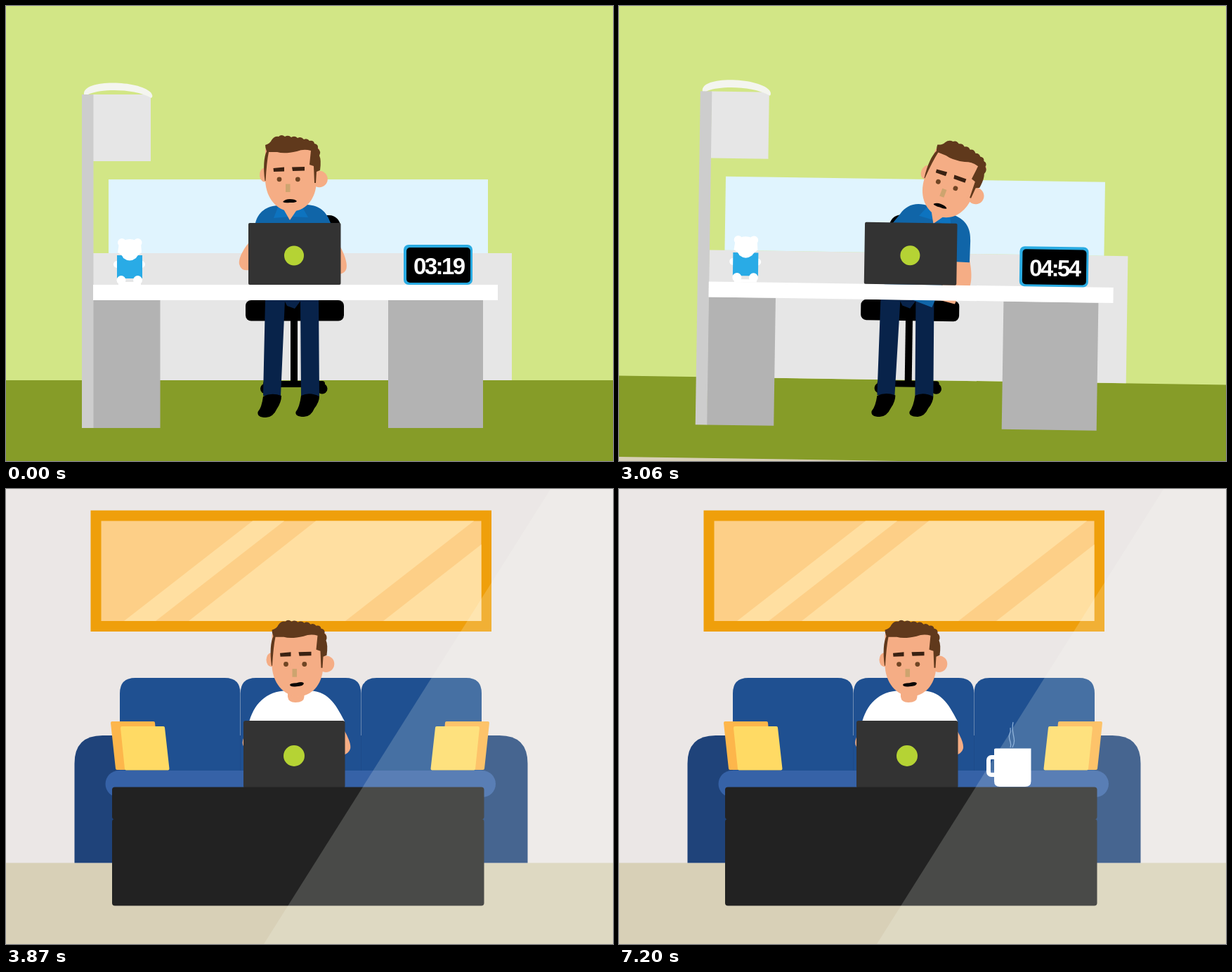
These frames come from a looping animation (864 by 648 pixels, 7230 ms). An HTML page:

```html
<!DOCTYPE html>
<html lang="en">
<head>
<meta charset="utf-8">
<title>Office to sofa</title>
<style>
  html, body { margin: 0; width: 100%; height: 100%; overflow: hidden; background: #d2e686; }
  svg { display: block; width: 100%; height: 100%; }
  text { font: bold 33px "Liberation Sans", Arial, sans-serif; letter-spacing: -2.6px; fill: #fff; }
</style>
</head>
<body>
<svg id="stage" viewBox="0 0 864 648"></svg>
<script>
const LOOP = 7230;
const SKIN = '#f5ad85', HAIR = '#60391c', SHIRT = '#1065a8', LIME = '#b5d334';
const stage = document.getElementById('stage');

const rect = (x, y, w, h, fill, rx = 0) =>
  `<rect x="${x}" y="${y}" width="${w}" height="${h}" rx="${rx}" fill="${fill}"/>`;
const dot = (x, y, r, fill) => `<circle cx="${x}" cy="${y}" r="${r}" fill="${fill}"/>`;
const path = (d, fill, extra = '') => `<path d="${d}" fill="${fill}" ${extra}/>`;

const head = (dx, dy, mouth) => `<g transform="translate(${dx} ${dy})">
  <ellipse cx="368" cy="240.500" rx="7" ry="10" fill="${SKIN}"/>
  ${dot(446, 246.5, 11.8, SKIN)}
  ${path('M369 204V248C370 277 389 292.500 406 292.500C425 292.500 441 277 442 250L446 203Z', SKIN)}
  ${path(`M368.500 249C366 230 367 215 371 207Q369 202 369 198Q376 196 378 191Q382 185 388 186
    Q392 182 397 186Q402 183 406 187Q411 184 415 188Q420 185 424 190Q429 188 432 192
    Q438 191 439 196Q445 197 444 203Q449 207 446 213Q449 219 447 234L442 236L441 252H439
    L438 228L432 226L434 206Q424 203 414 207Q396 211 386 208L374 208Q371 222 369.500 249Z`, HAIR)}
  ${path('M380.500 231L396 229.500V235.500L381 236ZM407 229.500L425 229V234.500L408 235Z', '#3a2112')}
  <g class="eyes">${dot(389, 246.8, 3.4, '#704524')}${dot(415.3, 246.8, 3.4, '#704524')}</g>
  ${rect(398, 253.5, 6.5, 11.5, '#cda46f')}
  ${path(mouth, '#0c0806')}
</g>`;

const bear = dot(165, 337, 6, '#fff') + dot(187.5, 337, 6, '#fff') + dot(158, 368, 5, '#fff') +
  dot(193, 368, 5, '#fff') + rect(158, 355, 36, 33, '#29abe6') +
  path('M161 338Q176 326 192 338L193 351Q187 355 185 359Q176 366 167 359Q165 354 159 351Z', '#fff') +
  dot(164, 390.5, 6.5, '#fff') + dot(187.5, 390.5, 6.5, '#fff') + rect(160, 393, 32, 4, '#fff');

const office = `
  ${rect(-900, -900, 2664, 1434, '#d2e686')}
  ${rect(-900, 533, 2664, 115.5, '#869c28')}
  ${rect(124, 352, 596, 181, '#e6e6e6')}
  ${rect(146, 247, 540, 105, '#e0f4fe')}
  ${rect(124, 126, 82, 95, '#e6e6e6')}
  ${path('M111 126C108 104 188 105 206 123Q210 128 207 131C182 117 137 118 119 125Q111 129 111 126Z', '#f4f5ef')}
  ${rect(124, 419, 95.5, 182, '#b3b3b3')}
  ${rect(544, 419, 135, 182, '#b3b3b3')}
  ${rect(108, 126, 16.5, 475, '#cdcdcd')}
  ${rect(380, 298, 96, 105, '#000', 16)}
  ${rect(341, 419, 140, 29.5, '#000', 8)}
  ${rect(405, 445, 10, 95, '#000')}
  ${rect(366, 534, 88, 9, '#000', 4)}
  ${dot(369.5, 545, 7.5, '#000')}${dot(450, 545, 7.5, '#000')}
  ${path('M369 419H397L391 556L366 555ZM419 419H445L446 556L420 555ZM396 419H420L411 431L400 427Z', '#08234a')}
  ${path('M366 556Q378 550 392 555Q392 564 386 573Q380 586 370 586Q357 586 358.500 578Q364 572 366 556ZM420 555Q432 549 446 556Q446 564 439 573Q434 585 424 585Q411 585 412.500 578Q418 571 420 555Z', '#000')}
  <g id="worker">
    ${path('M354 328C341 340 329 360 332.500 369Q335 378 347 376L370 345Z', SKIN, 'class="left"')}
    ${path('M466 328C480 346 487 366 484.500 374Q483 380 475 382L474 401L446 404L452 340Z', SKIN, 'class="right"')}
    ${path('M355 309C359 294 370 284 390 284L428 283C446 284 456 292 462 309L472 338L448 346L445 417H370V346L345 340Z', SHIRT)}
    ${path('M388 284L381 302L404 300L430 301L420 283Z', '#0d73bf')}
    ${path('M393 286L404 305L417 286Z', SKIN)}
    ${head(0, 0, 'M394 279Q397 275 404 275Q412 275 414 278Q412 280.500 404 280Q397 281 394 279Z')}
  </g>
  ${rect(124, 397, 576, 22, '#fff')}
  ${rect(345, 309, 131.5, 88, '#333', 2)}
  ${dot(410, 355.5, 14, LIME)}
  ${bear}
  ${rect(566, 340, 98, 57, '#29abe2', 7)}
  ${rect(570, 344, 91, 50, '#000', 5)}
  <text id="clock" x="580" y="382"></text>`;

const backCushion = x => path(`M${x} 440V291Q${x} 269 ${x + 22} 269H${x + 149.5}Q${x + 171.5} 269 ${x + 171.5} 291V440Z`, '#1f5091');
const soft = (points, color) =>
  `<polygon points="${points}" fill="${color}" stroke="${color}" stroke-width="4" stroke-linejoin="round"/>`;
const pillows = soft('151,333 210,333 216,398 158,398', '#fdb64b') +
  soft('165,340 224,340 230.500,398.500 171,398.500', '#ffda64');
const wisp = d => path(d, 'none', 'class="wisp" pathLength="1" stroke="#9dbfe3" stroke-width="1.300"');

const lounge = `
  ${rect(-900, -900, 2664, 1433, '#ebe7e6')}
  ${rect(-900, 532.5, 2664, 115.5, '#d8d0b7')}
  ${rect(120.5, 30.5, 570.5, 172.5, '#ef9f0b')}
  ${rect(135.5, 45.5, 541, 142.5, '#fdcf87')}
  ${path('M351 45.500H396L213 188H168ZM441 45.500H666L483 188H260ZM676.500 79V188H537Z', '#ffdfa1')}
  ${path('M97.500 532.500V391Q97.500 351 137.500 351H702.500Q742.500 351 742.500 391V532.500Z', '#1f437a')}
  ${[162, 333.8, 505.5].map(backCushion).join('')}
  ${rect(141.5, 401, 555.5, 38, '#3662a7', 19)}
  ${pillows}<g transform="translate(837 0) scale(-1 1)">${pillows}</g>
  <g id="sitter">
    ${path('M352 334C342 346 335 356 337 364Q340 374 352 372L372 345Z', SKIN, 'class="left"')}
    ${path('M470 326C484 346 492 362 490 370Q488 377 479 379L462 350Z', SKIN, 'class="right"')}
    ${path('M345 336C352 306 370 288 400 287H428C458 287 468 304 482 331L463 339L452 334V425H380V337L371 353Z', '#fff')}
    ${path('M401 284V296Q402 304 412 304Q424 304 424.500 296V284Z', SKIN)}
    ${head(9.5, 2.7, 'M394.500 276Q395 273.500 404 273.500Q413 271 414.500 274Q414 278 404 278.500Q395 279.500 394.500 276Z')}
  </g>
  ${rect(338, 330, 144.5, 96, '#333', 3)}
  ${dot(410, 380, 15, LIME)}
  ${rect(151, 424.5, 529.5, 46, '#222', 4)}
  ${rect(151, 470, 529.5, 123.5, '#222', 4)}
  <path id="sun" d="M775 0H864V648H367Z" fill="#f6fff4" opacity="0"/>
  <g id="steam">
    ${wisp('M557 368C560 361 553 356 556 349Q558 345 557 340')}
    ${wisp('M560 368C567 355 557 349 561 332')}
  </g>
  <g id="mug">
    <rect x="526" y="382" width="14" height="25" rx="4" fill="none" stroke="#fff" stroke-width="6"/>
    ${path('M534 371Q534 369.500 536 369.500H586.500V416Q586.500 424 578 424H542Q534 424 534 416Z', '#fff')}
  </g>`;

stage.innerHTML = `<g id="world">
  <g id="lounge" transform="rotate(180 432 648)">${lounge}</g>
  <g id="office">${office}</g>
</g>`;

const $ = id => document.getElementById(id);
const all = name => [...stage.querySelectorAll('.' + name)];
const parts = {
  world: $('world'), office: $('office'), lounge: $('lounge'), worker: $('worker'), sitter: $('sitter'),
  clock: $('clock'), sun: $('sun'), mug: $('mug'), steam: $('steam'),
  left: all('left'), right: all('right'), eyes: all('eyes'), wisps: all('wisp')
};
const progress = (t, from, to) => Math.min(1, Math.max(0, (t - from) / (to - from)));
const smooth = p => p * p * (3 - 2 * p);
const easeOut = p => 1 - (1 - p) ** 3;
const wave = (t, period) => (1 - Math.cos(2 * Math.PI * t / period)) / 2;
const set = (node, name, value) => node.setAttribute(name, value);
const shift = (nodes, dx, dy = 0) => nodes.forEach(n => set(n, 'transform', `translate(${dx} ${dy})`));

function render(t) {
  set(parts.world, 'transform', `rotate(${180 * progress(t, 3060, 3270)} 432 648)`);
  set(parts.office, 'display', t < 3270 ? 'inline' : 'none');
  set(parts.lounge, 'display', t > 3040 ? 'inline' : 'none');

  const minutes = 199 + Math.floor(t * 70 / 2250 + 1e-6);
  const pad = n => String(n).padStart(2, '0');
  parts.clock.textContent = pad(Math.floor(minutes / 60)) + ':' + pad(minutes % 60);

  // Both bodies are thrown sideways by the spin.
  set(parts.worker, 'transform', `rotate(${45 * progress(t, 2880, 3150) ** 2} 410 415)`);
  set(parts.sitter, 'transform', `rotate(${-50 * (1 - smooth(progress(t, 3270, 3630)))} 417 415)`);

  const local = t < 3270 ? t : t - 3870;
  const tap = wave(local, 275), gaze = wave(local, 3000) / 2;
  shift(parts.left, -4 * tap);
  shift(parts.right, -2 * tap);
  shift(parts.eyes, gaze, gaze);

  set(parts.sun, 'opacity', 0.18 * progress(t, 3480, 3750));
  const pop = easeOut(progress(t, 3990, 4290));
  set(parts.mug, 'transform', `translate(560 424) scale(${pop}) translate(-560 -424)`);

  const puff = t < 4530 ? 0 : (t - 4530) % 750 / 750;
  const grown = progress(puff, 0, 0.5);
  set(parts.steam, 'opacity', puff ? 0.85 * (1 - progress(puff, 0.6, 1)) : 0);
  parts.wisps.forEach(w => set(w, 'stroke-dasharray', `${grown} 2`));
}

const start = performance.now();
function tick() {
  render((performance.now() - start) % LOOP);
  requestAnimationFrame(tick);
}
tick();
</script>
</body>
</html>
```
